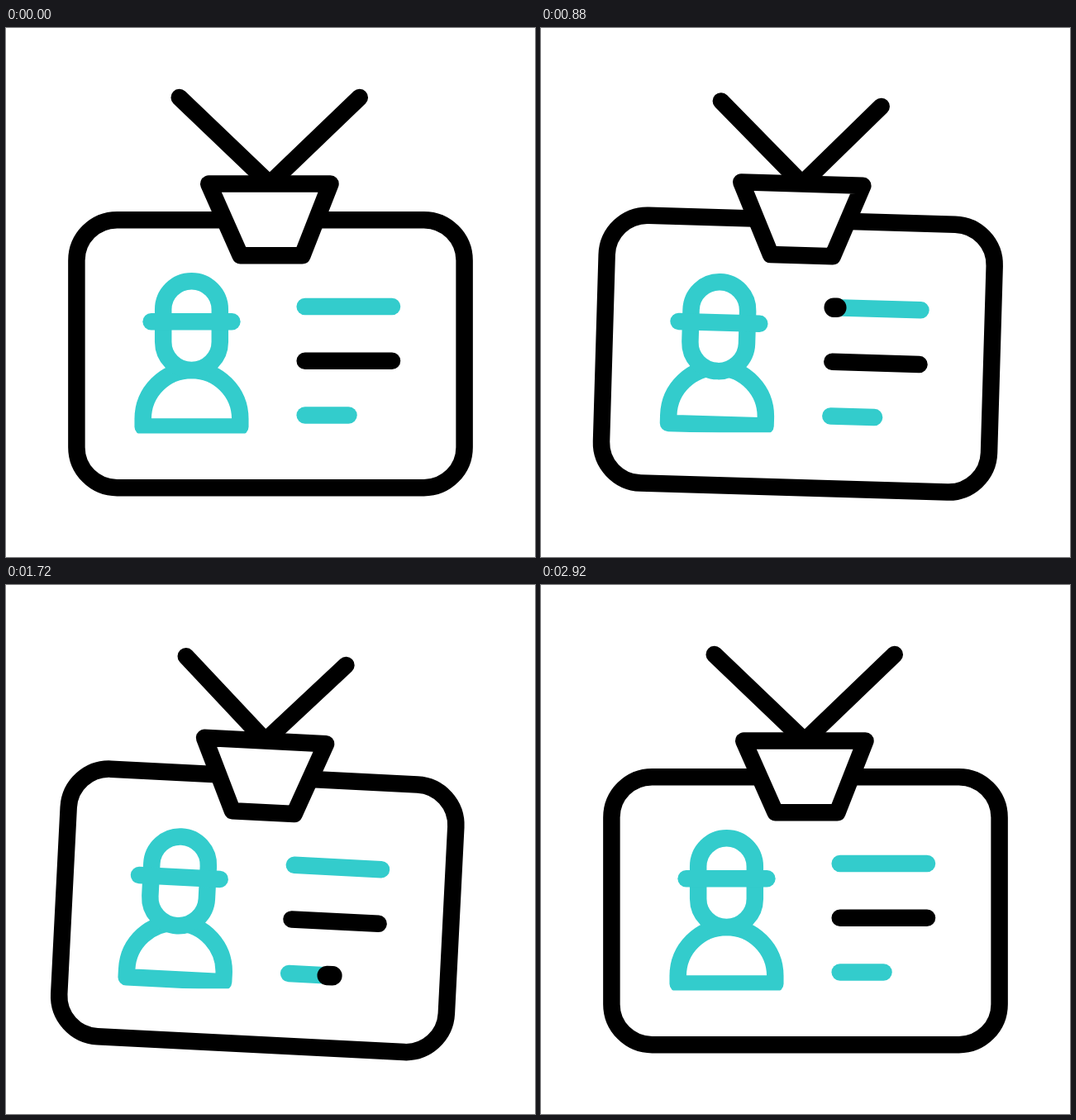
Animation of 640 by 640 pixels, one loop 3000 ms. Source, as an HTML page with a canvas:

```html
<!DOCTYPE html>
<html lang="en">
<head>
<meta charset="utf-8">
<title>Swinging badge</title>
<style>
html, body { margin: 0; width: 100%; height: 100%; overflow: hidden; background: #fff; }
canvas { display: block; width: 640px; height: 640px; }
</style>
</head>
<body>
<canvas id="stage" width="640" height="640"></canvas>
<script>
const ctx = document.getElementById('stage').getContext('2d');
const LOOP = 3000, STEP = 40, BLACK = '#000', TEAL = '#33cccc', WEIGHT = 20.5;
const PIVOT = { x: 319, y: 84 };
const SWING_TIMES = [120, 640, 1160, 1680, 2120, 2480], END = 2920;
const [START, FIRST_PEAK, , , LAST_PEAK, REST] = SWING_TIMES;
const BAR_X = 361.7, SWEEP_START = 840, SWEEP_TIME = 360, SWEEP_LAG = 200;

const ease = (t, from, to) => {
  const p = Math.min(1, Math.max(0, (t - from) / (to - from)));
  return p * p * (3 - 2 * p);
};

// The swing alternates sides and loses two degrees each time: 7, -5, 3, -1, then rest.
const peak = i => i > 0 && i < 5 ? (9 - 2 * i) * (i % 2 ? 1 : -1) : 0;

function poseAt(t) {
  let degrees = 0;
  for (let i = 1; i < SWING_TIMES.length; i++)
    degrees += (peak(i) - peak(i - 1)) * ease(t, SWING_TIMES[i - 1], SWING_TIMES[i]);
  const settle = ease(t, LAST_PEAK, REST);
  const loose = ease(t, START, FIRST_PEAK) - settle;
  const squash = settle - ease(t, REST, END);
  const nod = loose * 5 * Math.exp(-.135 * degrees);
  return { angle: degrees * Math.PI / 180, loose, squash, nod };
}

function stroke(color, build, weight = WEIGHT, fill) {
  ctx.beginPath();
  build();
  ctx.lineWidth = weight;
  ctx.strokeStyle = color;
  if (fill) {
    ctx.fillStyle = fill;
    ctx.fill();
  }
  ctx.stroke();
}

function line(color, points, weight) {
  stroke(color, () => points.forEach(([x, y]) => ctx.lineTo(x, y)), weight);
}

function drawStrap({ loose, squash }) {
  line(BLACK, [
    [209.7 + 8.3 * loose - 2.2 * squash, 84 + 7.4 * loose + 24 * squash],
    [319, 188.5],
    [427.8 - 15.8 * loose - 4.8 * squash, 84 + 8.2 * loose + 19 * squash]
  ]);
}

function drawClip() {
  stroke(BLACK, () => {
    ctx.moveTo(245.2, 188.6);
    ctx.lineTo(392.5, 188.6);
    ctx.lineTo(358.5, 275.2);
    ctx.lineTo(283.5, 275.2);
    ctx.closePath();
  }, WEIGHT, '#fff');
}

function drawBody({ angle, squash }) {
  const middle = 224.5, bottom = 482.6, rx = 58.8 - 2.4 * squash, ry = 59 - 9 * squash;

  // The body is cut off level just above its lowest edge.
  const lowest = PIVOT.y + (bottom - PIVOT.y) * Math.cos(angle)
    + (middle - PIVOT.x) * Math.sin(angle) + rx * Math.abs(Math.sin(angle));
  ctx.save();
  ctx.save();
  ctx.resetTransform();
  ctx.beginPath();
  ctx.rect(0, 0, 640, lowest + 7.9 - squash);
  ctx.restore();
  ctx.clip();
  stroke(TEAL, () => {
    ctx.moveTo(middle - rx, bottom);
    ctx.ellipse(middle, 473, rx, ry, 0, Math.PI, 2 * Math.PI);
    ctx.lineTo(middle + rx, bottom);
    ctx.closePath();
  });
  ctx.restore();
}

function drawHead({ squash, nod }) {
  const x = 224.5 - .25 * nod - squash, y = 306.2 + nod + 13.8 * squash;
  stroke(TEAL, () => ctx.roundRect(x - 34.3, y, 68.6, 107.9 - 5.8 * squash, 34.3), WEIGHT, '#fff');
  line(TEAL, [[x - 48.9, y + 49.1], [x + 48.9, y + 49.1]]);
}

// Text bars, each crossed in turn by a sweep of the other colour.
function drawBar(i, t) {
  const y = 337 + 65.7 * i, length = i < 2 ? 105.3 : 52.8;
  const [color, sweep] = i % 2 ? [BLACK, TEAL] : [TEAL, BLACK];
  const start = SWEEP_START + SWEEP_LAG * i;
  const at = begin => BAR_X + length * ease(t, begin, begin + SWEEP_TIME);
  const head = at(start), tail = at(start + SWEEP_LAG);
  line(color, [[BAR_X, y], [BAR_X + length, y]]);
  if (head > tail) line(sweep, [[tail, y], [head, y]], 23.5);
}

function draw(t) {
  const pose = poseAt(t);
  ctx.fillStyle = '#fff';
  ctx.fillRect(0, 0, 640, 640);
  ctx.lineCap = ctx.lineJoin = 'round';
  ctx.save();
  ctx.translate(PIVOT.x, PIVOT.y);
  ctx.rotate(pose.angle);
  ctx.translate(-PIVOT.x, -PIVOT.y);

  stroke(BLACK, () => ctx.roundRect(85.4, 232.2, 469.2, 324, 49));
  drawStrap(pose);
  drawClip();
  drawBody(pose);
  drawHead(pose);
  for (let i = 0; i < 3; i++) drawBar(i, t);
  ctx.restore();
}

function tick() {
  const t = performance.now() % LOOP;
  draw(Math.floor(t / STEP) * STEP);
  requestAnimationFrame(tick);
}
tick();
</script>
</body>
</html>
```
